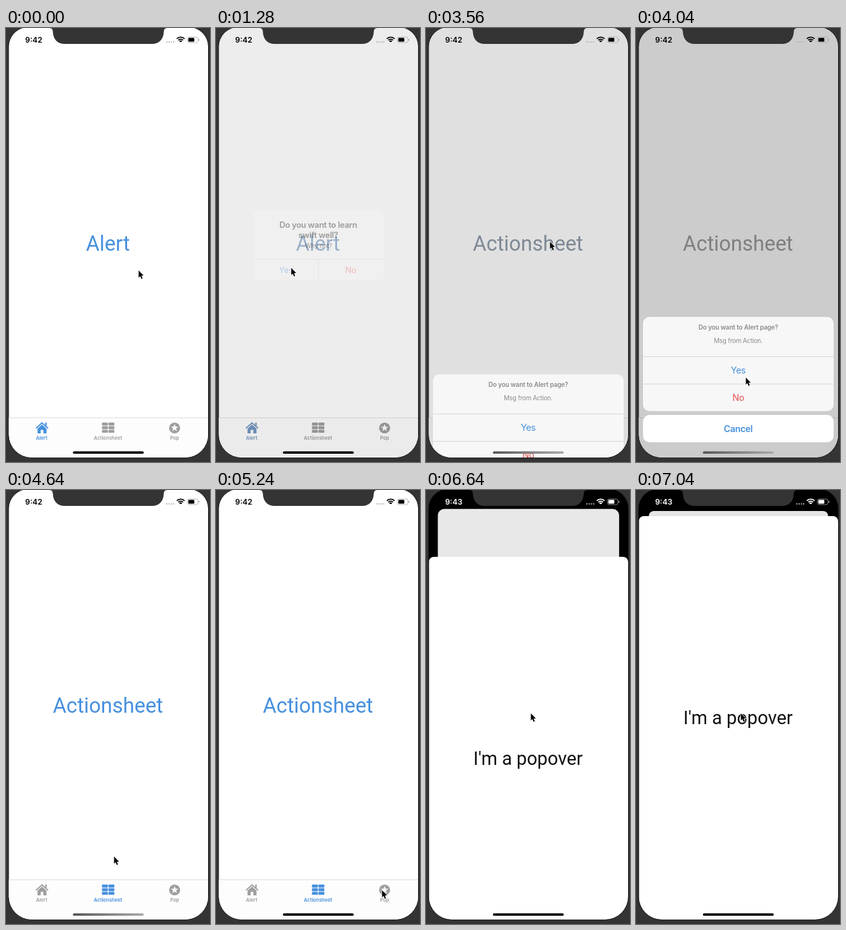
An HTML page with a canvas for the animation above (7400 ms loop, 320x682 px).

```html
<!DOCTYPE html>
<html lang="en">
<head>
<meta charset="utf-8">
<title>Alert, action sheet and popover</title>
<style>
html, body { margin: 0; width: 100%; height: 100%; overflow: hidden; background: #353434; }
canvas { display: block; width: 320px; height: 682px; }
</style>
</head>
<body>
<canvas></canvas>
<script>
const LOOP = 7400, W = 320, H = 682;
const BLUE = [70, 144, 222], GRAY = [158, 158, 160], RED = '#e5504f';
const UI = 'Inter, sans-serif', DISPLAY = 'Roboto, sans-serif';
const SCREEN = { x: 4.5, y: -1, w: 312.5, h: 676 };

const canvas = document.querySelector('canvas');
const c = canvas.getContext('2d');
const dpr = window.devicePixelRatio || 1;
canvas.width = W * dpr;
canvas.height = H * dpr;

const lerp = (a, b, k) => a + (b - a) * k;
const clamp = k => Math.max(0, Math.min(1, k));
const rgb = a => `rgb(${a.map(Math.round)})`;
const mix = (a, b, k) => rgb(a.map((v, i) => lerp(v, b[i], k)));
const smooth = k => k * k * (3 - 2 * k);
const linear = k => k;
const easeIn = k => k * k;
const easeOut = k => 1 - (1 - k) ** 2;
const cubicOut = k => 1 - (1 - k) ** 3;
const span = (t, start, length, ease) => ease(clamp((t - start) / length));

// Pointer stops: time, x, y, easing used to get there
const PATH = [
  [0, 208, 381], [20, 208, 381], [280, 139, 329], [600, 139, 329],
  [1040, 118, 377], [1360, 118, 377], [2420, 161, 627], [2720, 161, 627],
  [2840, 155, 595, easeIn], [3100, 214, 390, linear], [3280, 194.5, 336, easeOut],
  [3740, 194.5, 336], [4120, 169.5, 576], [4640, 169.5, 576],
  [5320, 264, 631], [5580, 264, 631], [6040, 211.5, 499, easeIn],
  [6280, 164.5, 351, easeOut], [LOOP, 164.5, 351]
];

function pointerAt(t) {
  const i = PATH.findIndex(p => p[0] > t);
  const a = PATH[i - 1], b = PATH[i];
  const k = (b[3] || smooth)((t - a[0]) / (b[0] - a[0]));
  return [lerp(a[1], b[1], k), lerp(a[2], b[2], k)];
}

function text(str, x, y, size, color, { weight = 400, font = UI, spacing = 0 } = {}) {
  c.font = `${weight} ${size}px ${font}`;
  c.letterSpacing = spacing + 'px';
  c.textAlign = 'center';
  c.fillStyle = color;
  c.fillText(str, x + spacing / 2, y);
}

function box(x, y, w, h, r, color) {
  c.beginPath();
  c.roundRect(x, y, w, h, r);
  c.fillStyle = color;
  c.fill();
}

function shape(points, color) {
  c.beginPath();
  points.forEach(p => c.lineTo(...p));
  c.closePath();
  c.fillStyle = color;
  c.fill();
}

function line(points, color, width) {
  c.beginPath();
  points.forEach(p => c.lineTo(...p));
  c.strokeStyle = color;
  c.lineWidth = width;
  c.stroke();
}

function dot(x, y, r, color) {
  c.beginPath();
  c.arc(x, y, r, 0, 7);
  c.fillStyle = color;
  c.fill();
}

function house(color) {
  line([[47, 629], [56.5, 620.5], [66, 629]], color, 1.8);
  box(61.5, 620, 2.3, 5, 0, color);
  shape([[49.5, 629.5], [56.5, 623.3], [63.5, 629.5], [63.5, 637], [58.6, 637],
    [58.6, 631.5], [54.4, 631.5], [54.4, 637], [49.5, 637]], color);
}

function grid(color) {
  for (let row = 0; row < 3; row++)
    for (let col = 0; col < 2; col++)
      box(150.5 + col * 10.2, 620 + row * 5.7, 9.3, 4.7, 1.2, color);
}

function star(color) {
  dot(264.5, 628.5, 8.6, color);
  shape(Array.from({ length: 10 }, (_, i) => {
    const a = i * Math.PI / 5, r = i % 2 ? 2.5 : 6.2;
    return [264.5 + r * Math.sin(a), 628.5 - r * Math.cos(a)];
  }), '#fff');
}

const TABS = [
  { name: 'Alert', x: 56, icon: house, title: [160, 32.5] },
  { name: 'Actionsheet', x: 160, icon: grid, title: [160, 32.5] },
  { name: 'Pop', x: 264.5, icon: star, title: [162, 29.5] }
];

function drawPage(tab, dim) {
  box(0, -2, W, H, 0, '#fff');
  const tint = mix(BLUE, GRAY, clamp(dim * 1.4));
  const { name, title } = TABS[tab];
  text(name, title[0], 350, title[1], tint, { font: DISPLAY });
  box(0, 612, W, 70, 0, '#fdfdfd');
  box(0, 612, W, 0.8, 0, '#d4d4d4');
  TABS.forEach((item, i) => {
    const color = i === tab ? tint : rgb(GRAY);
    item.icon(color);
    text(item.name, item.x, 647, 7.6, color, { weight: 600 });
  });
  box(0, -2, W, H + 2, 0, `rgba(0,0,0,${0.2 * dim})`);
}

function drawAlert(p, scale) {
  if (p <= 0) return;
  c.save();
  c.globalAlpha = p;
  c.translate(160.5, 341.5);
  c.scale(scale, scale);
  c.translate(-160.5, -341.5);
  box(58, 286, 205.5, 111, 10, 'rgba(247,247,247,.96)');
  const bold = { weight: 600, spacing: -0.25 };
  text('Do you want to learn', 160.5, 313.7, 12.8, '#000', bold);
  text('swift well?', 160.5, 330, 12.8, '#000', bold);
  text('Why not?', 161, 345.5, 9.8, '#000', { spacing: -0.15 });
  box(58, 363, 205.5, 0.8, 0, '#c4c4c6');
  box(160.3, 363, 0.8, 34, 0, '#c4c4c6');
  text('Yes', 110, 385, 12.8, rgb(BLUE));
  text('No', 211.5, 385, 12.8, RED);
  c.restore();
}

function drawSheet(p) {
  if (p <= 0) return;
  c.save();
  c.translate(0, lerp(H, 454, p));
  box(11, 0, 299, 148, 10, '#f7f7f7');
  text('Do you want to Alert page?', 160.5, 20, 9.8, '#8a8a8c', { weight: 600, spacing: -0.1 });
  text('Msg from Action.', 160.5, 41, 9.8, '#8a8a8c', { spacing: -0.2 });
  box(11, 62, 299, 0.8, 0, '#cbcbcd');
  box(11, 105, 299, 0.8, 0, '#cbcbcd');
  const row = { spacing: -0.35 };
  text('Yes', 160.5, 89, 14, rgb(BLUE), row);
  text('No', 160.5, 132, 14, RED, row);
  box(11, 154, 299, 43, 10, '#fff');
  text('Cancel', 160.5, 181, 14, rgb(BLUE), { weight: 600, spacing: -0.35 });
  c.restore();
}

function drawPopover(p) {
  if (p <= 0) return;
  c.save();
  c.translate(0, lerp(H + 5, 41, p) - 41);
  box(SCREEN.x, 41, SCREEN.w, H, [8, 8, 0, 0], '#fff');
  text("I'm a popover", 160, 368, 28.8, '#111', { font: DISPLAY });
  c.restore();
}

function drawStatus(clock, color) {
  text(clock, 43.5, 23, 12, color, { weight: 600 });
  for (let i = 0; i < 4; i++) dot(252.3 + i * 3.6, 21.8, 1.15, '#b4b4b4');
  const wifi = [[8.6, 1.9], [5.4, 1.9], [2.3, 2.3]];
  for (const [r, width] of wifi) {
    c.beginPath();
    c.arc(274, 23, r, -Math.PI * 0.75, -Math.PI * 0.25);
    c.strokeStyle = color;
    c.lineWidth = width;
    c.stroke();
  }
  c.beginPath();
  c.roundRect(284.6, 14.2, 16.4, 8.8, 2.6);
  c.strokeStyle = '#a6a6a6';
  c.lineWidth = 0.8;
  c.stroke();
  box(302, 17, 1.2, 3.2, 0.6, '#a6a6a6');
  box(286, 15.6, 9.4, 6, 1.3, color);
}

function drawNotch() {
  c.beginPath();
  c.moveTo(68, -2);
  c.lineTo(68, 0);
  c.quadraticCurveTo(73.5, 0, 73.5, 6);
  c.bezierCurveTo(74, 18, 81, 25, 92, 25);
  c.lineTo(229, 25);
  c.bezierCurveTo(240, 25, 247, 18, 247.5, 6);
  c.quadraticCurveTo(247.5, 0, 253, 0);
  c.lineTo(253, -2);
  c.fillStyle = '#353434';
  c.fill();
}

function drawPointer(x, y) {
  c.save();
  c.translate(x, y);
  c.lineJoin = 'round';
  const arrow = [[0, 0], [0, 11.2], [2.5, 8.9], [4.3, 13.2], [6.2, 12.4], [4.4, 8.2], [7.8, 8]];
  line([...arrow, arrow[0]], '#fff', 1.5);
  shape(arrow, '#000');
  c.restore();
}

function draw(t) {
  const tab = t < 2480 ? 0 : t < 5360 ? 1 : 2;
  const alertIn = span(t, 430, 400, cubicOut);
  const alert = alertIn - span(t, 1120, 400, easeOut);
  const sheet = span(t, 3440, 455, cubicOut) - span(t, 4200, 400, easeOut);
  const pop = span(t, 6340, 560, cubicOut);

  c.setTransform(dpr, 0, 0, dpr, 0, 0);
  box(0, 0, W, H, 0, '#353434');
  c.save();
  c.beginPath();
  c.roundRect(SCREEN.x, SCREEN.y, SCREEN.w, SCREEN.h, [30, 30, 36, 36]);
  c.strokeStyle = '#161616';
  c.lineWidth = 1.6;
  c.stroke();
  c.clip();
  box(0, -2, W, H + 2, 0, '#000');

  // The page shrinks behind the popover
  c.save();
  const scale = lerp(1, 0.9, pop);
  c.translate(160.75, 33 * pop);
  c.scale(scale, scale);
  c.translate(-160.75, 0);
  if (pop > 0) {
    c.beginPath();
    c.roundRect(SCREEN.x, 0, SCREEN.w, H, lerp(30, 9, pop));
    c.clip();
  }
  drawPage(tab, Math.max(alert, sheet));
  box(0, -2, W, H + 2, 0, `rgba(0,0,0,${0.1 * pop})`);
  c.restore();

  drawAlert(alert, lerp(1.17, 1, alertIn));
  drawSheet(sheet);
  drawPopover(pop);
  drawStatus(t < 5640 ? '9:42' : '9:43', pop > 0.4 ? '#fff' : '#000');

  let bar = '#000';
  if (t > 3480 && t < 4900) {
    bar = c.createLinearGradient(105, 0, 216, 0);
    bar.addColorStop(0, '#555');
    bar.addColorStop(1, '#aaa');
  }
  box(105, 665.3, 111, 3.8, 1.9, bar);
  c.restore();

  drawNotch();
  drawPointer(...pointerAt(t));
}

const begin = performance.now();
function frame() {
  draw((performance.now() - begin) % LOOP);
  requestAnimationFrame(frame);
}
frame();
</script>
</body>
</html>
```
